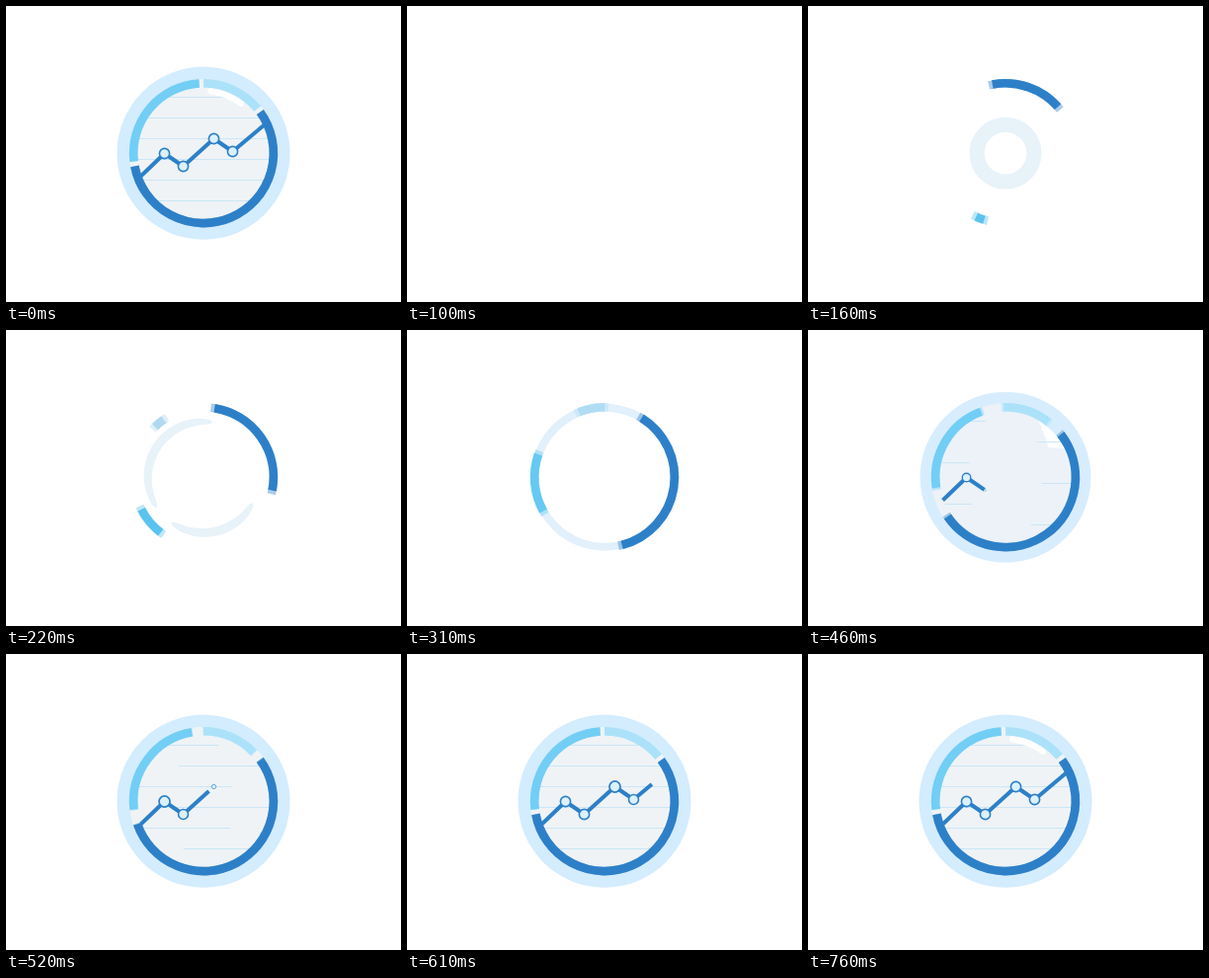
Recreate the animation shown at these times as an HTML page. Size 400x300 px, loop 2.88 s.

```html
<!DOCTYPE html>
<html lang="en">
<head>
<meta charset="utf-8">
<title>Chart badge</title>
<style>
  html, body { margin: 0; width: 100%; height: 100%; overflow: hidden; background: #fff; }
  svg { display: block; width: 100vw; height: 100vh; }
</style>
</head>
<body>
<svg viewBox="0 0 400 300">
  <defs>
    <clipPath id="dial"><circle cx="200" cy="149.2" r="75"/></clipPath>
  </defs>
  <path id="halo" fill-rule="evenodd"/>
  <g id="fill" clip-path="url(#dial)"></g>
  <g id="grid" stroke="#cae6f5"></g>
  <path id="trend" fill="none" stroke="#2d80c8" stroke-width="4" stroke-linejoin="round"/>
  <g id="ring" fill="none" stroke-width="8.6"></g>
  <g id="nodes" fill="#dcf1fd" stroke="#2d80c8" stroke-width="1.6"></g>
  <path id="shine" fill="none" stroke="#fff" stroke-width="6" stroke-linecap="round"/>
</svg>
<script>
const LOOP = 2880, INTRO = 100, STEP = 30, SETTLED = 760;
const CX = 200, CY = 149.2, RING = 70.9;
const $ = id => document.getElementById(id);

function set(el, attrs) {
  for (const k in attrs) el.setAttribute(k, attrs[k]);
}
function add(parent, tag, attrs = {}) {
  const el = document.createElementNS('http://www.w3.org/2000/svg', tag);
  set(el, attrs);
  return parent.appendChild(el);
}
const mix = (a, b, u) => a + (b - a) * u;
const blend = (a, b, u) => `rgb(${a.map((v, i) => Math.round(mix(v, b[i], u)))})`;
const progress = (t, from, to) => Math.max(0, Math.min(1, (t - from) / (to - from)));
const easeOut = (t, from, to) => 1 - (1 - progress(t, from, to)) ** 2;

// Angles are in degrees, clockwise from the top.
function polar(r, deg) {
  const a = deg * Math.PI / 180;
  return [CX + r * Math.sin(a), CY - r * Math.cos(a)].map(v => v.toFixed(2));
}
function arc(r, from, to) {
  return `M${polar(r, from)}A${r} ${r} 0 ${to - from > 180 ? 1 : 0} 1 ${polar(r, to)}`;
}
function disc(r) {
  return `M${CX - r} ${CY}a${r} ${r} 0 1 1 ${2 * r} 0a${r} ${r} 0 1 1 ${-2 * r} 0Z`;
}
function crescent(from, to, inner, outer, taper) {
  const mid = (inner + outer) / 2, rim = [], hole = [];
  for (let i = 0; i <= 40; i++) {
    const u = i / 40, deg = mix(from, to, u);
    const half = (outer - inner) / 2 * mix(1, Math.sin(Math.PI * u) ** 0.3, taper);
    rim.push(polar(mid + half, deg));
    hole.unshift(polar(mid - half, deg));
  }
  return 'M' + rim.concat(hole).join('L') + 'Z';
}

// Halo: a splash that opens into a ring, breaks up, closes and spreads.
function drawHalo(t) {
  const outer = 74.5 * easeOut(t, 100, 310) + 13.1 * easeOut(t, 310, 520);
  const inner = 66.5 * easeOut(t, 130, 300);
  const gap = Math.sin(Math.PI * progress(t, 160, 300));
  const d = gap > 0.01
    ? crescent(mix(226, 237, gap), mix(424, 368, gap), inner, outer, gap)
      + crescent(mix(64, 119, gap), mix(226, 215, gap), inner, outer, gap)
    : disc(outer) + disc(inner);
  set($('halo'), { d, fill: blend([231, 242, 249], [211, 236, 254], progress(t, 220, 520)) });
}

// Dial face: drops swell until they cover it.
const drops = [[153, 186, 14, 8.5], [138, 196, 13, 20], [233, 209, 20, 10]]
  .map(shape => ({ shape, el: add($('fill'), 'ellipse') }));

function drawFill(t) {
  const k = Math.min(25, (Math.max(0, t - 370) / 30) ** 2);
  for (const { shape: [cx, cy, rx, ry], el } of drops) set(el, { cx, cy, rx: rx * k, ry: ry * k });
  set($('fill'), { fill: blend([231, 241, 251], [239, 243, 246], progress(t, 400, 490)) });
}

// Grid: lines sweep in from alternating sides.
const gridLines = Array.from({ length: 6 }, (_, i) => {
  const y = 92.5 + 21 * i;
  const reach = Math.sqrt(67 ** 2 - (y - CY) ** 2) * (i % 2 ? 1 : -1);
  return { start: CX + reach, end: CX - reach, el: add($('grid'), 'line', { y1: y, y2: y }) };
});

function drawGrid(t) {
  const u = easeOut(t, 440, 610);
  for (const { start, end, el } of gridLines) set(el, { x1: start, x2: mix(start, end, u) });
}

// Ring: three arcs, one after the other, turn and lengthen; their tails settle before their heads.
const arcs = [
  { tail: [-30, 54], head: [-1, 259.3], tint: [45, 128, 200], color: [45, 128, 200] },
  { tail: [194, 263.2], head: [198, 356.5], tint: [90, 195, 238], color: [114, 206, 245] },
  { tail: [307, 360], head: [312, 410.5], tint: [176, 216, 238], color: [171, 226, 249] }
].map((a, i) => ({ ...a, begin: 110 + 40 * i,
  blur: add($('ring'), 'path', { opacity: 0.4 }), body: add($('ring'), 'path') }));

function drawRing(t) {
  const spread = 3 * (1 - progress(t, 400, 550));
  for (const { tail, head, tint, color, begin, blur, body } of arcs) {
    const from = mix(...tail, easeOut(t, begin, 520));
    const to = mix(...head, easeOut(t, begin, 610));
    const stroke = blend(tint, color, progress(t, 220, 400));
    const shown = t > begin;
    set(body, { stroke, d: shown ? arc(RING, from, to) : '' });
    set(blur, { stroke, d: shown ? arc(RING, from - spread, to + spread) : '' });
  }
}

// Trend line at a steady pace, with markers that pop up along it.
const points = [[136.5, 172.5], [160.5, 149.5], [179.5, 162.5], [210.5, 134.5], [229.5, 147.5], [264.5, 118]];
const nodes = points.slice(1, -1).map((at, i) => ({ at, begin: 400 + 45 * i, el: add($('nodes'), 'circle', { r: 5.1 }) }));

function pop(u) {
  return 1 - (1 - u) ** 2 * Math.cos(3.6 * u);
}

function drawTrend(t) {
  let left = Math.max(0, t - 368) * 0.6;
  let d = left ? `M${points[0]}` : '';
  for (let i = 1; i < points.length && left > 0; i++) {
    const [x0, y0] = points[i - 1], [x1, y1] = points[i];
    const length = Math.hypot(x1 - x0, y1 - y0), u = Math.min(1, left / length);
    d += `L${mix(x0, x1, u)} ${mix(y0, y1, u)}`;
    left -= length;
  }
  set($('trend'), { d });
  for (const { at, begin, el } of nodes) {
    set(el, { transform: `translate(${at}) scale(${pop(progress(t, begin, begin + 180))})` });
  }
}

function drawShine(t) {
  set($('shine'), { d: t > 610 ? arc(63, 6.5, mix(6.5, 37, progress(t, 610, 730))) : '' });
}

function draw(ms) {
  const time = ms % LOOP;
  const t = time < INTRO ? SETTLED : Math.min(SETTLED, INTRO + Math.floor((time - INTRO) / STEP) * STEP);
  for (const part of [drawHalo, drawFill, drawGrid, drawTrend, drawRing, drawShine]) part(t);
}

const begin = performance.now();
function tick() {
  draw(performance.now() - begin);
  requestAnimationFrame(tick);
}
tick();
</script>
</body>
</html>
```
